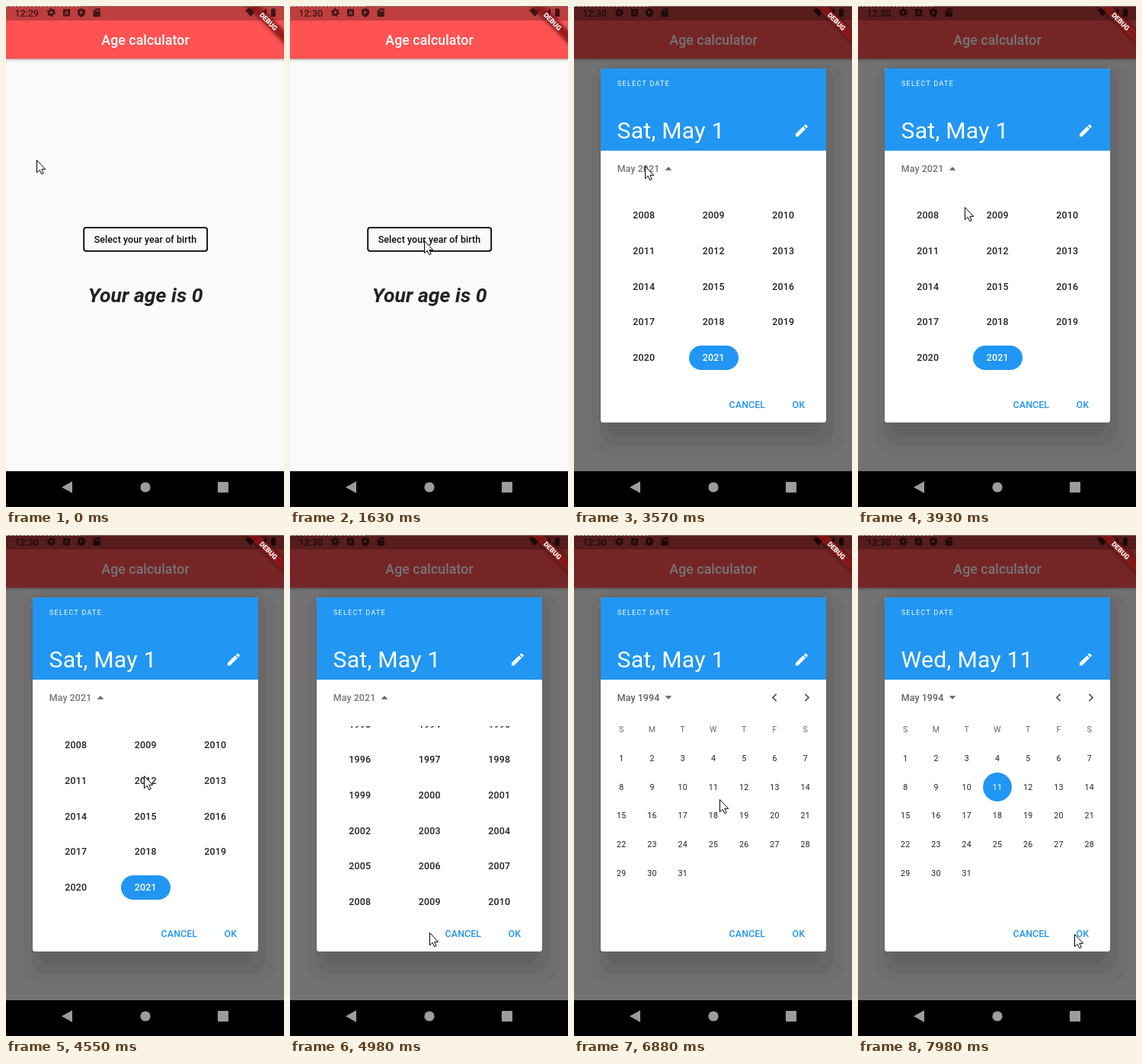
An HTML page for the animation above (8 s loop, 365 px wide and 658 px high).

```html
<!DOCTYPE html>
<html lang="en">
<head>
<meta charset="utf-8">
<title>Age calculator</title>
<style>
  html, body { margin: 0; width: 100%; height: 100%; overflow: hidden; background: #fafafa; }
  svg { display: block; width: 100%; height: 100%; font-family: Roboto, sans-serif; }
  text { white-space: pre; }
  .mid { text-anchor: middle; }
  .med { font-weight: 500; font-size: 12.43px; }
  .day { font-size: 10.65px; letter-spacing: .3px; text-anchor: middle; }
  .year { font-weight: 500; font-size: 12.43px; letter-spacing: .15px; text-anchor: middle; fill: #212121; }
  .head { font-size: 30.2px; letter-spacing: .22px; fill: #fff; }
</style>
</head>
<body>
<svg viewBox="0 0 365 658" preserveAspectRatio="none" xmlns="http://www.w3.org/2000/svg">
  <defs>
    <linearGradient id="drop" x2="0" y2="1">
      <stop offset="0" stop-opacity=".32"/><stop offset=".4" stop-opacity=".1"/><stop offset="1" stop-opacity="0"/>
    </linearGradient>
    <clipPath id="list"><rect x="35" y="251" width="296" height="248"/></clipPath>
    <filter id="soft" x="-30%" y="-100%" width="160%" height="300%"><feGaussianBlur stdDeviation="2.4"/></filter>
  </defs>

  <rect width="365" height="658" fill="#fafafa"/>
  <rect y="69" width="365" height="5" fill="url(#drop)"/>
  <rect width="365" height="69.3" fill="#ff5252"/>
  <rect width="365" height="19" fill="#bf3e3e"/>

  <g id="status" fill="#3f1616">
    <text id="clock" class="med" x="11.5" y="13.6"></text>
    <g fill="none" stroke="#3f1616">
      <circle cx="59.5" cy="8.5" r="3" stroke-width="2.4"/>
      <circle cx="59.5" cy="8.5" r="4.7" stroke-width="1.8" stroke-dasharray="2.4 2.52"/>
    </g>
    <path fill-rule="evenodd" d="M75 4h9v9.4h-9zM79 5.8 76.8 11.6h1.1l.5-1.4h2.2l.5 1.4h1.1L80 5.8zM78.7 9.2l.8-2.2.8 2.2z"/>
    <path fill-rule="evenodd" d="M99 3l5 2v3.8c0 3-2.1 5-5 6-2.9-1-5-3-5-6V5zM97.3 6v5l4-2.5z"/>
    <path fill-rule="evenodd" d="M117.8 3.2h5.2q.8 0 .8.8v9.2q0 .8-.8.8h-7.6q-.8 0-.8-.8V6.4zM117.6 5v2.4h1V5zm2 0v2.4h1V5zm2 0v2.4h1V5z"/>
    <path d="M314 5.4Q321.2 0 328.4 5.4L321.2 14z"/>
    <path d="M342 3v11h-11z"/>
    <path d="M349.5 3h3v1.2h1.6V14h-6.2V4.2h1.6z"/>
  </g>

  <text class="mid" x="183" y="51" font-size="17.75" font-weight="500" letter-spacing=".06" fill="#fff">Age calculator</text>
  <rect x="102.2" y="291.2" width="162" height="30.6" rx="3" fill="none" stroke="#000" stroke-width="1.8"/>
  <text class="med mid" x="183" y="311" letter-spacing=".09" fill="#0a0a0a">Select your year of birth</text>
  <text class="mid" x="183.2" y="389" font-size="26.6" font-weight="700" font-style="italic" fill="#212121">Your age is 0</text>

  <g id="dialog">
    <rect y="1" width="365" height="610" fill-opacity=".54"/>
    <rect x="22" y="74" width="333" height="516" rx="28" fill-opacity=".035"/>
    <rect x="33" y="79" width="308" height="498" rx="22" fill-opacity=".06"/>
    <rect x="43" y="84" width="282" height="481" rx="16" fill-opacity=".06"/>
    <rect x="35" y="82" width="296" height="465" rx="3.5" fill="#fff"/>
    <path d="M35 190V85.5q0-3.5 3.5-3.5h289q3.500 0 3.500 3.500V190z" fill="#2196f3"/>
    <text x="57" y="105" font-size="8.9" letter-spacing="1.33" fill="#fff">SELECT DATE</text>
    <text id="date" class="head" x="56.500" y="174"></text>
    <path transform="translate(288.300 152.800) scale(.8876)" fill="#fff" d="M3 17.250V21h3.750L17.810 9.940l-3.750-3.750zM20.710 7.040c.39-.39.39-1.020 0-1.410l-2.340-2.340c-.39-.39-1.020-.39-1.410 0l-1.830 1.830 3.750 3.750z"/>
    <text id="month" class="med" x="56.700" y="218" letter-spacing=".09"></text>
    <path id="arrow" d="M-5 -2.500L0 2.500 5 -2.500z" fill="#666"/>
    <g id="days2021"></g>
    <g id="days1994"></g>
    <g id="picked"><circle cx="183" cy="331" r="18.900" fill="#2196f3"/><text class="day" x="183.100" y="334.800" fill="#fff">11</text></g>
    <g id="years" clip-path="url(#list)"><g id="rows"></g></g>
    <g class="med" fill="#2196f3" letter-spacing=".08">
      <text x="203.600" y="528.400">CANCEL</text>
      <text x="286.500" y="528.400">OK</text>
    </g>
  </g>

  <g transform="translate(366 -1) rotate(45)">
    <rect x="-42" y="24.800" width="84" height="10.700" opacity=".6" filter="url(#soft)"/>
    <rect x="-42" y="24.800" width="84" height="10.700" fill="#b71c1c" fill-opacity=".63"/>
    <text class="mid" y="33.400" font-size="9.050" font-weight="900" fill="#fff">DEBUG</text>
  </g>
  <rect width="365" height="1" fill="#80696b"/>
  <path d="M0 .5H98" stroke="#c8bcbc" stroke-dasharray="3 2"/>

  <rect y="611" width="365" height="47"/>
  <g fill="#9c9c9c">
    <path d="M73 632l14-7.700v15.400z"/>
    <circle cx="183" cy="632" r="6.600"/>
    <rect x="278" y="625" width="14" height="14" rx="1"/>
  </g>
  <path id="cursor" d="M.5.5V16.800L4.200 13.300 6.700 18.700 9.200 17.600 6.800 12.300H11.700z" fill="#fff" stroke="#000"/>
</svg>
<script>
const LOOP = 8000;
const $ = id => document.getElementById(id);
const OPEN = 2260, TO_YEARS = 3570, TO_DAYS = 6200, PICK = 7410;

// time, x, y
const pointer = [
  [0, 40, 202], [460, 60, 229], [580, 126, 269], [730, 171, 300], [850, 176, 308],
  [2680, 168, 280], [2800, 154, 230], [2920, 140, 190], [3060, 106, 201], [3180, 93, 210],
  [3810, 113, 234], [3930, 140, 264], [4050, 177, 296],
  [4310, 179, 303], [4430, 180, 309], [4550, 181, 316], [4700, 182, 415], [4830, 183, 497],
  [4980, 183, 522], [5130, 183, 535], [5260, 184, 450], [5380, 184, 355], [5530, 181, 315],
  [5670, 185, 290], [5800, 188, 274], [6610, 189, 290], [6750, 194, 322], [6880, 191, 347],
  [7030, 183, 338], [7150, 178, 332], [7710, 214, 408], [7840, 251, 487], [7980, 284, 524]
];
// time, list offset
const scroll = [
  [0, 0], [4430, .5], [4550, 1], [4700, 100], [4830, 182.5],
  [4980, 206.5], [5130, 219.5], [5260, 226], [5380, 229.3]
];

const text = (cls, x, y, s, fill) => `<text class="${cls}" x="${x}" y="${y}" fill="${fill}">${s}</text>`;
const colX = c => 62.2 + c * 40.26;
const rowY = r => 293.3 + r * 37.65;
const chevron = (x, dir, fill) =>
  `<path transform="translate(${x} 213.5) scale(${dir * .8876} .8876)" d="M3.400-4.600L2-6-4 0 2 6 3.400 4.600-1.200 0z" fill="${fill}"/>`;

function monthGrid(first, selected, color, nextColor) {
  let out = chevron(263.3, 1, '#555') + chevron(305.8, -1, nextColor);
  [...'SMTWTFS'].forEach((d, i) => out += text('day', colX(i), 259.4, d, '#666'));
  for (let d = 1; d <= 31; d++) {
    const n = d - 1 + first, x = colX(n % 7), y = rowY(Math.floor(n / 7));
    if (d === selected) out += `<circle cx="${x}" cy="${y}" r="18.900" fill="#2196f3"/>`;
    out += text('day', x + .1, y + 3.8, d, d === selected ? '#fff' : color);
  }
  return out;
}

function yearRows() {
  let out = '<rect x="151" y="446" width="65" height="32" rx="16" fill="#2196f3"/>';
  for (let y = 1984; y <= 2021; y++) {
    const n = y - 1984, x = 91.7 + n % 3 * 91.5, top = 275 + (Math.floor(n / 3) - 8) * 46.67;
    out += y === 2021
      ? `<text class="year" x="${x}" y="${top + 4.4}" style="fill:#fff">${y}</text>`
      : text('year', x, top + 4.4, y, '#212121');
  }
  return out;
}

$('days2021').innerHTML = monthGrid(6, 1, '#9e9e9e', '#999');
$('days1994').innerHTML = monthGrid(0, 0, '#212121', '#555');
$('rows').innerHTML = yearRows();

const at = (steps, t) => steps.findLast(s => s[0] <= t);
const show = (id, on) => $(id).style.display = on ? '' : 'none';
const write = (id, s) => { if ($(id).textContent !== s) $(id).textContent = s; };

function draw(t) {
  const inYears = t >= TO_YEARS && t < TO_DAYS;
  const [, x, y] = at(pointer, t);
  write('clock', t < 1630 ? '12:29' : '12:30');
  write('date', t < PICK ? 'Sat, May 1' : 'Wed, May 11');
  write('month', t < TO_DAYS ? 'May 2021' : 'May 1994');
  $('month').setAttribute('fill', inYears ? '#757575' : '#616161');
  $('arrow').setAttribute('transform', `translate(124 213.500) scale(.8876 ${inYears ? -.8876 : .8876})`);
  show('dialog', t >= OPEN);
  show('days2021', t < TO_YEARS);
  show('years', inYears);
  show('days1994', t >= TO_DAYS);
  show('picked', t >= PICK);
  $('rows').setAttribute('transform', `translate(0 ${at(scroll, t)[1]})`);
  $('cursor').setAttribute('transform', `translate(${x} ${y})`);
}

const start = performance.now();
function tick() {
  draw((performance.now() - start) % LOOP);
  requestAnimationFrame(tick);
}
tick();
</script>
</body>
</html>
```
